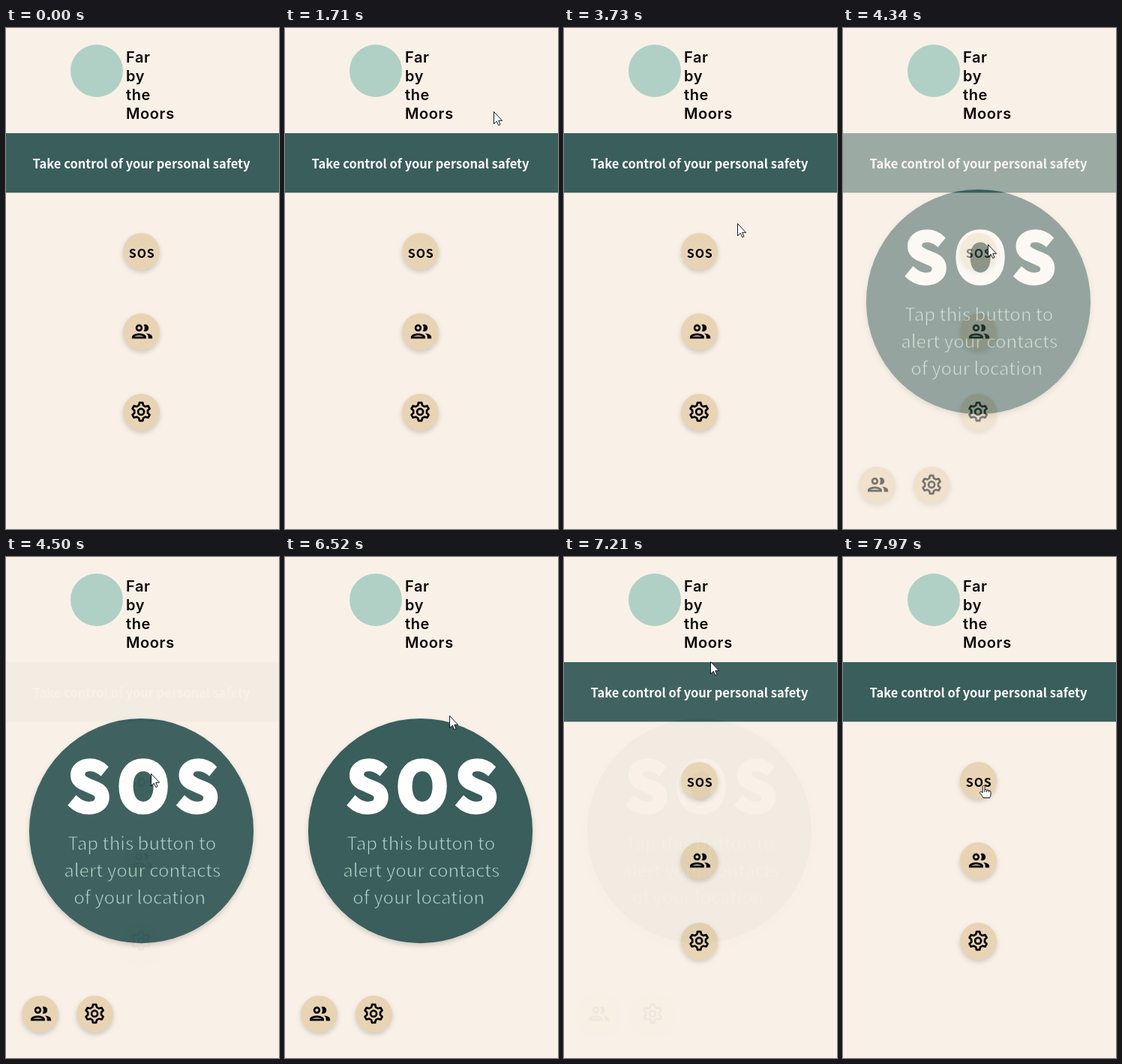
An HTML page that plays this animation: 364 by 667 pixels, repeating every 8 s.

```html
<!DOCTYPE html>
<html lang="en">
<head>
<meta charset="utf-8">
<title>Personal safety app</title>
<style>
  html, body { margin: 0; width: 100%; height: 100%; overflow: hidden; background: #f9f1e8; }
  svg { display: block; width: 100vw; height: 100vh; }
  text { font-family: "Noto Sans CJK JP", "Noto Sans CJK SC", "Noto Sans", sans-serif; }
  .bg { fill: #f9f1e8; }
  .teal { fill: #395e5c; }
  .disc { filter: drop-shadow(0 3px 3px rgba(0, 0, 0, .17)); }
  .sand { fill: #e8d4b4; }
  .mid { text-anchor: middle; }
  .brand text { font: 600 20px Inter, sans-serif; letter-spacing: .6px; fill: #0c0706; }
  .banner { font-size: 16.5px; font-weight: 700; fill: #fff; }
  .label { font-size: 16px; font-weight: 700; letter-spacing: .8px; }
  .huge { font-size: 90.5px; font-weight: 700; fill: #fff; stroke: #fff; stroke-width: 5.5; }
  /* an outline in the disc colour thins the strokes */
  .hint { font-size: 24.1px; font-weight: 400; fill: #b4d5ca; stroke: #395e5c; stroke-width: .75; }
  .line { fill: none; stroke: #000; stroke-width: 2; }
  #cursor path { fill: #fff; stroke: #15151c; stroke-linejoin: round; }
</style>
</head>
<body>
<svg viewBox="0 0 364 667" preserveAspectRatio="none">
  <defs>
    <g id="brand" class="brand">
      <circle cx="121" cy="57" r="35" fill="#b0d0c5"/>
      <text x="160" y="46">Far</text>
      <text x="160" y="71">by</text>
      <text x="160" y="96">the</text>
      <text x="160" y="121">Moors</text>
    </g>
    <circle id="button" class="disc sand" r="24.5"/>
    <g id="people">
      <use href="#button"/>
      <g transform="translate(-15.3 -16.8) scale(1.36)">
        <circle class="line" cx="9" cy="8.5" r="2.5"/>
        <path class="line" d="M3 18V17.3C3 15.8 7 14.8 9 14.8S15 15.8 15 17.3V18Z"/>
        <path d="M13.5 5.3A3.5 3.5 0 1 1 13.5 11.7Q15.5 8.5 13.5 5.3ZM16 13.8C18.5 14 22 15.2 22 17.3V19H18V17.3Q18 15.2 16 13.8Z"/>
      </g>
    </g>
    <g id="settings">
      <use href="#button"/>
      <g class="line" transform="translate(-.4 -.6) scale(1.33)" stroke-linejoin="round">
        <path id="gear"/>
        <circle r="3"/>
      </g>
    </g>
  </defs>

  <g id="home">
    <rect class="bg" width="364" height="667"/>
    <use href="#brand"/>
    <rect class="teal" y="140" width="364" height="79.3"/>
    <text class="banner mid" x="180.5" y="187">Take control of your personal safety</text>
    <use href="#button" x="180.5" y="297.5"/>
    <text class="label mid" x="181.2" y="306">SOS</text>
    <use href="#people" x="180.5" y="404.5"/>
    <use href="#settings" x="180.5" y="511.5"/>
  </g>

  <g id="alarm" opacity="0">
    <rect class="bg" width="364" height="667"/>
    <use href="#brand"/>
    <circle class="disc teal" cx="180.5" cy="364.6" r="149.6"/>
    <g class="huge mid">
      <text x="110.5" y="338.5">S</text>
      <text x="183" y="338.5">O</text>
      <text x="255" y="338.5">S</text>
    </g>
    <g class="hint mid">
      <text x="181.3" y="390">Tap this button to</text>
      <text x="181.8" y="426">alert your contacts</text>
      <text x="178.3" y="462">of your location</text>
    </g>
    <use href="#people" x="45.5" y="608.5"/>
    <use href="#settings" x="118.5" y="608.5"/>
  </g>

  <g id="cursor">
    <path id="arrow" d="M.5 .5V16.6L4.3 13.2L6.8 18.6L9 17.5L6.7 12.3H11.6Z"/>
    <path id="hand" d="M-1.8 9.8V1.6Q-1.8 .4 -.4 .4Q1 .4 1 1.6V6Q2.4 5 3.6 6.3Q5.2 5.5 6.2 6.9Q8.8 6.4 9 8.9V12Q9 14.4 7.6 16.6H-1
      Q-2 13.8 -5.2 10.5Q-6.1 8.7 -4.5 8.3Q-3.2 8.3 -1.8 9.8ZM1 6V9M3.6 6.3V9M6.2 6.9V9.3"/>
  </g>
</svg>
<script>
const LOOP = 8000, FADE = 320, OPEN = 4260, CLOSE = 6976, ENTER = 230;
const START = [348, 606];
const $ = id => document.getElementById(id);

// pointer moves: from ms, to ms, end x, end y, bend; it rests in between
const moves = [
  [230, 460, 306, 541, 0],
  [690, 1550, 328, 9, -.77],
  [1560, 1710, 278, 111, 0],
  [1720, 2320, 79, 225, 1.1],
  [2890, 3330, 246, 252, .2],
  [3450, 3730, 231, 260, 0],
  [3740, 4100, 193, 288, 0],
  [5000, 5350, 200, 302, 0],
  [5600, 5890, 219, 222, 0],
  [6450, 6520, 219, 211, 0],
  [6530, 6750, 191, 106, 0],
  [7050, 7670, 214, 302, 0],
  [7700, 7970, 188, 304, 0]
];

const clamp = u => Math.min(1, Math.max(0, u));
const smooth = u => u * u * (3 - 2 * u);
const fade = (t, start) => 1 - Math.pow(1 - clamp((t - start) / FADE), 2.5);

// quadratic curve whose control point sits off the middle of the chord
function curve([x0, y0], [x1, y1], bend, u) {
  const dx = x1 - x0, dy = y1 - y0, lift = 2 * u * (1 - u) * bend;
  return [x0 + dx * u - dy * lift, y0 + dy * u + dx * lift];
}

function pointer(t) {
  let at = START;
  for (const [from, to, x, y, bend] of moves) {
    if (t < from) break;
    at = curve(at, [x, y], bend, smooth(clamp((t - from) / (to - from))));
  }
  return at;
}

function gearPath() {
  const points = [];
  for (let i = 0; i < 24; i++) {
    const outer = i % 4 === 1 || i % 4 === 2;
    const r = outer ? 9.2 : 6.8;
    const mid = Math.floor(i / 4) * 60 - 90;
    const a = (mid + (outer ? 10 : 19) * (i % 4 < 2 ? -1 : 1)) * Math.PI / 180;
    points.push((r * Math.cos(a)).toFixed(2) + " " + (r * Math.sin(a)).toFixed(2));
  }
  return "M" + points.join("L") + "Z";
}

function overLink(x, y, alarm) {
  if (alarm === 1) return x > 86 && x < 226 && y > 19 && y < 122;
  return alarm === 0 && [297.5, 404.5, 511.5].some(cy => Math.hypot(x - 180.5, y - cy) < 24.5);
}

function show(id, on) { $(id).setAttribute("visibility", on ? "visible" : "hidden"); }

function draw() {
  const t = performance.now() % LOOP;
  const alarm = fade(t, OPEN) - fade(t, CLOSE);
  const [x, y] = pointer(t);
  const on = t >= ENTER, hand = overLink(x, y, alarm);
  $("alarm").setAttribute("opacity", alarm);
  $("cursor").setAttribute("transform", `translate(${Math.round(x)} ${Math.round(y)})`);
  show("arrow", on && !hand);
  show("hand", on && hand);
  requestAnimationFrame(draw);
}

$("gear").setAttribute("d", gearPath());
draw();
</script>
</body>
</html>
```
